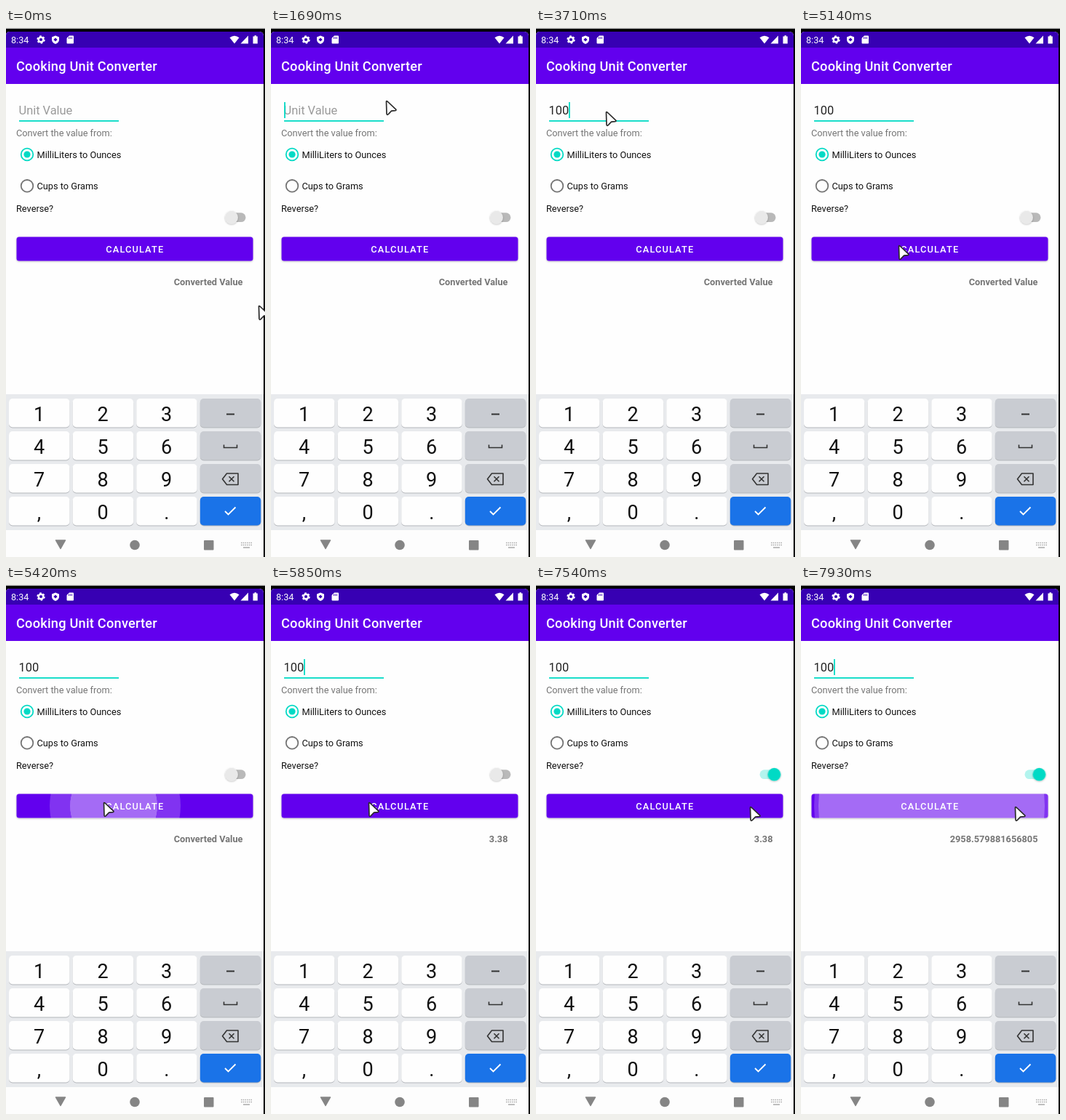
These frames come from a looping animation (356 by 728 pixels, 8 s). An HTML page:

```html
<!DOCTYPE html>
<html lang="en">
<head>
<meta charset="utf-8">
<title>Unit converter</title>
<style>
html, body { margin: 0; width: 100%; height: 100%; overflow: hidden; background: #000; }
svg { display: block; width: 356px; height: 728px; font-family: Roboto, sans-serif; }
.body { font-size: 12.76px; fill: #111; }
.grey { fill: #757575; }
.field { font-size: 16.4px; fill: #222; }
.value { font-size: 12.76px; font-weight: 700; fill: #757575; text-anchor: end; }
.digit { font-size: 27px; fill: #111; text-anchor: middle; }

.anim { animation: 8s step-end infinite; }
.hint { animation-name: hint; }
.one { animation-name: one; }
.ten { animation-name: ten; }
.hundred { animation-name: hundred; }
.caret { animation-name: caret; }
.pointer { animation-name: pointer; }
.label { animation-name: label; }
.ounces { animation-name: ounces; }
.millis { animation-name: millis; }
.track { animation-name: track; }
.thumb { animation-name: thumb; }
.wave { animation-name: wave; }
.core { animation-name: core; }

@keyframes hint { 0% { opacity: 1 } 41.75%, 100% { opacity: 0 } }
@keyframes one { 0% { opacity: 0 } 41.75% { opacity: 1 } 44.125%, 100% { opacity: 0 } }
@keyframes ten { 0% { opacity: 0 } 44.125% { opacity: 1 } 46.375%, 100% { opacity: 0 } }
@keyframes hundred { 0% { opacity: 0 } 46.375%, 100% { opacity: 1 } }
@keyframes caret {
  0% { opacity: 0; transform: none }
  7% { opacity: 1; transform: none }
  14% { opacity: 0; transform: none }
  21.125% { opacity: 1; transform: none }
  27.875% { opacity: 0; transform: none }
  31.125% { opacity: 1; transform: none }
  38.25% { opacity: 0; transform: none }
  41.75% { opacity: 1; transform: translateX(9.2px) }
  44.125% { opacity: 1; transform: translateX(18.4px) }
  46.375% { opacity: 1; transform: translateX(27px) }
  51.75% { opacity: 0; transform: translateX(27px) }
  59% { opacity: 1; transform: translateX(27px) }
  64.25% { opacity: 0; transform: translateX(27px) }
  73.125% { opacity: 1; transform: translateX(27px) }
  78.625% { opacity: 0; transform: translateX(27px) }
  85.625% { opacity: 1; transform: translateX(27px) }
  90.875% { opacity: 0; transform: translateX(27px) }
  97.5%, 100% { opacity: 1; transform: translateX(27px) }
}
@keyframes pointer {
  0% { transform: translate(346px, 381px) }
  14% { transform: translate(338px, 370px) }
  15.75% { transform: translate(298px, 308px) }
  17.5% { transform: translate(234px, 214px) }
  19.375% { transform: translate(178px, 130px) }
  21.125% { transform: translate(157px, 99px) }
  22.625% { transform: translate(132px, 105px) }
  24.25% { transform: translate(104px, 112px) }
  26% { transform: translate(95px, 114px) }
  59% { transform: translate(97px, 130px) }
  60.75% { transform: translate(109px, 206px) }
  62.5% { transform: translate(128px, 284px) }
  64.25% { transform: translate(133px, 298px) }
  75.125% { transform: translate(139px, 297px) }
  76.875% { transform: translate(176px, 288px) }
  78.625% { transform: translate(236px, 273px) }
  80.25% { transform: translate(285px, 264px) }
  82% { transform: translate(302px, 261px) }
  83.75% { transform: translate(304px, 261px) }
  90.875% { transform: translate(302px, 275px) }
  92.5% { transform: translate(297px, 294px) }
  94.125%, 100% { transform: translate(293px, 304px) }
}
@keyframes label { 0% { opacity: 1 } 69.625%, 100% { opacity: 0 } }
@keyframes ounces { 0% { opacity: 0 } 69.625% { opacity: 1 } 99.125%, 100% { opacity: 0 } }
@keyframes millis { 0% { opacity: 0 } 99.125%, 100% { opacity: 1 } }
@keyframes track {
  0% { fill: #b9b9b9; transform: none }
  85.625% { fill: #b5e3df; transform: none }
  87.5%, 100% { fill: #b3f4ee; transform: translateX(1px) }
}
@keyframes thumb {
  0% { fill: #e9e9e9; transform: none }
  85.625% { fill: #6cdfd3; transform: translateX(12px) }
  87.5%, 100% { fill: #03dac5; transform: translateX(17.5px) }
}
@keyframes wave {
  0% { opacity: 0; transform: translate(140px, 304px) scale(60) }
  67.75% { opacity: .2; transform: translate(150px, 304px) scale(90) }
  69.625% { opacity: .2; transform: translate(177px, 304px) scale(166) }
  73.125% { opacity: 0; transform: translate(177px, 304px) scale(166) }
  97.5% { opacity: .2; transform: translate(270px, 304px) scale(90) }
  99.125%, 100% { opacity: .2; transform: translate(184px, 304px) scale(166) }
}
@keyframes core {
  0% { opacity: 0; transform: translate(140px, 304px) scale(30) }
  67.75% { opacity: .28; transform: translate(148px, 304px) scale(60) }
  69.625% { opacity: .28; transform: translate(175px, 304px) scale(155) }
  73.125% { opacity: 0; transform: translate(175px, 304px) scale(155) }
  97.5% { opacity: .28; transform: translate(275px, 304px) scale(60) }
  99.125%, 100% { opacity: .28; transform: translate(179.5px, 304px) scale(155.5) }
}
</style>
</head>
<body>
<svg viewBox="0 0 356 728">
  <defs>
    <clipPath id="screen"><path d="M0 728V10q0-5 5-5H348q6 0 6 6V728Z"/></clipPath>
    <clipPath id="button"><rect x="14.5" y="287.5" width="325" height="33" rx="3.5"/></clipPath>
    <filter id="soft" x="-30%" y="-30%" width="160%" height="170%">
      <feDropShadow dx="0" dy=".8" stdDeviation=".8" flood-opacity=".3"/>
    </filter>
  </defs>
  <rect width="356" height="728"/>
  <rect width="356" height="1" fill="#ccc"/>

  <g clip-path="url(#screen)">
    <rect width="356" height="728" fill="#fefefe"/>
    <rect width="356" height="27" fill="#3700b3"/>
    <rect y="27" width="356" height="50" fill="#6200ee"/>

    <!-- status bar -->
    <g fill="#fff">
      <text x="7" y="20.5" font-size="12.6">8:34</text>
      <circle cx="48" cy="16" r="3.3" fill="none" stroke="#fff" stroke-width="2.4"/>
      <circle cx="48" cy="16" r="4.9" fill="none" stroke="#fff" stroke-width="1.6" stroke-dasharray="2.6 2.53"/>
      <path d="M68 10.5l5 2v3.6q0 4-5 6-5-2-5-6v-3.6Z"/>
      <path d="M68 13.4l2.6 2.6-2.6 2.6-2.6-2.6Z" fill="#3700b3"/>
      <path d="M87 10.5h5q1 0 1 1v9q0 1-1 1h-7.5q-1 0-1-1v-6.500Z"/>
      <path d="M86.500 12.500v2.300M88.500 12.500v2.300M90.500 12.500v2.300" stroke="#3700b3"/>
      <path d="M307.500 13.200q6.500-5 13 0L314 21.500Z"/>
      <path d="M333 10.500v11H322.500Z"/>
      <path d="M340 11.500h1.500v-1.200h2.500v1.200h1.800v10H339.500v-10Z"/>
    </g>
    <text x="14" y="59" font-size="18.2" font-weight="500" letter-spacing=".2275" fill="#fff">Cooking Unit Converter</text>

    <!-- form -->
    <g class="field">
      <text class="anim hint" x="17.500" y="119.300" fill="#9a9a9a" style="fill:#9a9a9a">Unit Value</text>
      <text class="anim one" x="17.500" y="119.300">1</text>
      <text class="anim ten" x="17.500" y="119.300">10</text>
      <text class="anim hundred" x="17.500" y="119.300">100</text>
    </g>
    <rect x="18" y="127" width="137" height="1.800" fill="#03dac5"/>
    <rect class="anim caret" x="18" y="102" width="1.800" height="22" fill="#03dac5"/>
    <text class="body grey" x="14" y="149">Convert the value from:</text>
    <g fill="none" stroke-width="1.800">
      <circle cx="29" cy="174" r="8.300" stroke="#03dac5"/>
      <circle cx="29" cy="217.300" r="8.300" stroke="#757575"/>
    </g>
    <circle cx="29" cy="174" r="4.600" fill="#03dac5"/>
    <text class="body" x="42.500" y="179">MilliLiters to Ounces</text>
    <text class="body" x="42.500" y="222">Cups to Grams</text>
    <text class="body" x="14" y="252.700">Reverse?</text>
    <rect class="anim track" x="306.500" y="254.300" width="23" height="12.800" rx="6.400"/>
    <circle class="anim thumb" cx="310" cy="260.700" r="8.900" filter="url(#soft)"/>

    <rect x="14.500" y="287.500" width="325" height="33" rx="3.500" fill="#6200ee" filter="url(#soft)"/>
    <g clip-path="url(#button)" fill="#fff">
      <circle class="anim wave" r="1"/>
      <circle class="anim core" r="1"/>
    </g>
    <text x="137.300" y="308.700" font-size="12.76" font-weight="500" letter-spacing="1.14" fill="#fff">CALCULATE</text>
    <g class="value">
      <text class="anim label" x="325.500" y="353.500">Converted Value</text>
      <text class="anim ounces" x="325.500" y="353.500">3.38</text>
      <text class="anim millis" x="325.500" y="353.500">2958.579881656805</text>
    </g>

    <!-- keyboard -->
    <rect y="504" width="356" height="187" fill="#e8eaed"/>
    <g id="keys"></g>
    <g fill="none" stroke="#333" stroke-width="1.600">
      <path d="M303 531.500h11" stroke-width="2"/>
      <path d="M299.500 573.500v4h18v-4"/>
      <path d="M303.500 613h15.500v15.500h-15.500l-6-7.750Z" stroke-linejoin="round"/>
      <path d="M306.500 617.300l7 7m0-7l-7 7"/>
      <path d="M301 665l4.500 4.500 10-10" stroke="#fff" stroke-width="1.800"/>
    </g>

    <!-- navigation bar -->
    <rect y="691" width="356" height="37" fill="#fdfdfd"/>
    <g fill="#858585">
      <path d="M68.500 705h13l-6.500 11.500Z" stroke="#858585" stroke-width="1.500" stroke-linejoin="round"/>
      <circle cx="177" cy="711.500" r="6.800"/>
      <rect x="272" y="705" width="13.500" height="13.500" rx="1"/>
    </g>
    <path d="M323 708.500h15M323 711.500h15" stroke="#aaa" stroke-width="1.500" stroke-dasharray="1.500 1.200"/>
    <path d="M326 715h9" stroke="#aaa" stroke-width="1.500"/>
  </g>

  <path class="anim pointer" d="M1.500 2.500Q1.500 .8 3 2L14.500 12.800Q15.700 14.300 13.800 14.600L8.600 15.200 4 19.800Q2.300 21.200 2 19Z"
    fill="#fff" stroke="#2b2b2b" stroke-width="1.700" stroke-linejoin="round"/>
</svg>
<script>
const keys = document.getElementById("keys");
const make = (tag, attrs, text = "") => {
  const node = document.createElementNS(keys.namespaceURI, tag);
  for (const name in attrs) node.setAttribute(name, attrs[name]);
  node.textContent = text;
  keys.append(node);
};
["123", "456", "789", ",0."].forEach((row, r) => {
  for (let c = 0; c < 4; c++) {
    const x = 4 + c * 87.6, y = 510 + r * 45;
    const fill = c < 3 ? "#fefefe" : r < 3 ? "#c9ccd2" : "#1a73e8";
    const box = { x, width: 83.500, height: 39.500, rx: 5 };
    make("rect", { ...box, y: y + 1, fill: "#b4b7bb" });
    make("rect", { ...box, y, fill });
    if (c < 3) make("text", { class: "digit", x: x + 41.500, y: y + 30.500 }, row[c]);
  }
});
</script>
</body>
</html>
```
